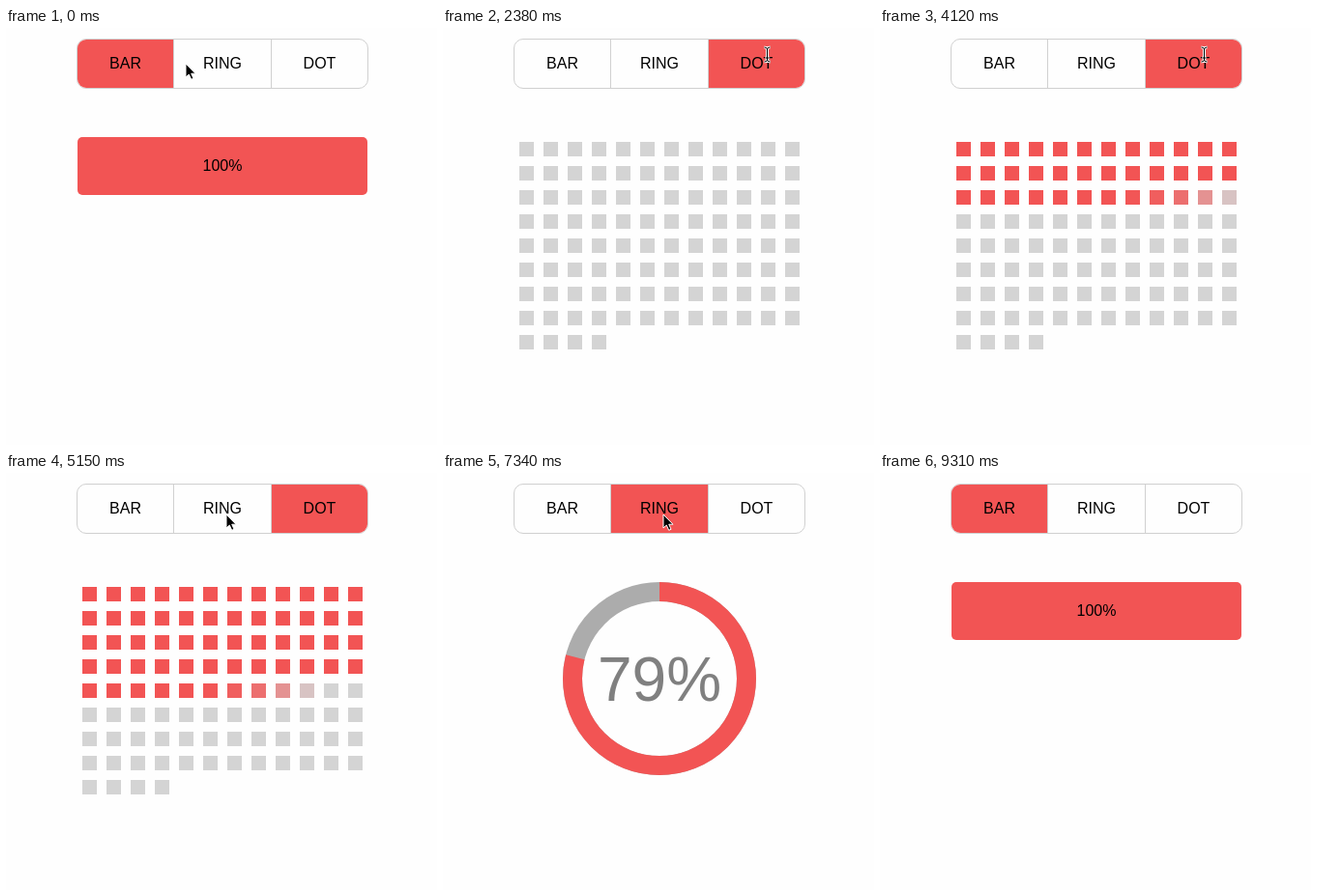
An HTML page for the animation above (9.95 s loop, 446 px wide and 432 px high).

```html
<!DOCTYPE html>
<html lang="en">
<meta charset="utf-8">
<title>Progress: bar, ring, dot</title>
<style>
  html, body { margin: 0; width: 100%; height: 100%; overflow: hidden; background: #fefefe; }
  body { position: relative; font: 16px "Liberation Sans", Arial, sans-serif; color: #000; }
  #tabs, #bar, svg { position: absolute; }
  #tabs { left: 73px; top: 11px; width: 300px; height: 50px; border: 1px solid #d0d0d0;
    border-radius: 10px; overflow: hidden; display: flex; line-height: 50px; text-align: center; }
  #tabs div { width: 99px; }
  #tabs div:nth-child(2) { width: 100px; border: solid #d0d0d0; border-width: 0 1px; }
  #tabs .on, #bar { background: #f25454; }
  #bar { left: 74px; top: 113px; height: 60px; line-height: 60px; border-radius: 5px;
    overflow: hidden; white-space: nowrap; text-align: center; }
  svg { left: 0; top: 0; }
  #ring circle { fill: none; stroke-width: 20; }
</style>
<div id="tabs"><div>BAR</div><div>RING</div><div>DOT</div></div>
<div id="bar"></div>
<svg width="446" height="432">
  <g id="ring">
    <circle cx="224" cy="213" r="90" stroke="#acacac"/>
    <circle id="arc" cx="224" cy="213" r="90" stroke="#f25454" pathLength="100" transform="rotate(-90 224 213)"/>
    <text id="label" x="224" y="235.5" font-size="64" text-anchor="middle" fill="#808080"></text>
  </g>
  <g id="dots"></g>
  <g id="cursor">
    <path id="arrow" d="M0 0V14L3.3 11L5.7 16.3L8 15.3L5.7 10.2H10Z" stroke="#fff" stroke-linejoin="round"/>
    <g id="beam" fill="none">
      <path id="stem" d="M-3 -7.5Q0 -7.5 0 -5.5Q0 -7.5 3 -7.5M0 -5.5V5.5M-3 7.5Q0 7.5 0 5.5Q0 7.5 3 7.5M-2 3.5H2" stroke="#fff" stroke-width="2.6"/>
      <use href="#stem"/>
      <path d="M-3 -7.5Q0 -7.5 0 -5.5Q0 -7.5 3 -7.5M0 -5.5V5.5M-3 7.5Q0 7.5 0 5.5Q0 7.5 3 7.5M-2 3.5H2" stroke="#000"/>
    </g>
  </g>
</svg>
<script>
const $ = id => document.getElementById(id);
const LOOP = 9950, STEP = 57.8, LAST = 161;   // the picture advances once per step
const BAR = 0, RING = 1, DOT = 2;
const RATE = 5.9;                             // percent per step

// start step, view, percent at the start
const views = [[-20, BAR, 100], [9, RING, 2], [41, DOT, 0], [114, RING, 3], [142, BAR, 1]];

// step, x, y, pointer shape
const moves = [
  [0, 186, 37, "arrow"], [1, 196, 36, "arrow"], [2, 210, 39, "beam"],
  [25, 210, 39, "beam"], [26, 227, 38, "beam"], [28, 270, 36, "arrow"],
  [30, 322, 29, "beam"], [31, 344, 22, "arrow"], [32, 340, 27, "beam"],
  [33, 335.5, 29.5, "beam"], [35, 335.5, 29.5, "beam"], [37, 335.5, 27.5, "beam"],
  [76, 335.5, 27.5, "beam"], [77, 300, 32, "arrow"], [82, 53, 40, "arrow"],
  [88, 228, 43, "arrow"], [133, 228, 43, "arrow"], [137, 111, 38, "beam"],
  [157, 111, 38, "beam"], [158, 160, 100, "arrow"], [159, 244, 237, "arrow"],
  [160, 381, 415, "arrow"], [161, 600, 600, "arrow"]
];

const dots = Array.from({ length: 100 }, (_, i) => {
  const r = document.createElementNS("http://www.w3.org/2000/svg", "rect");
  r.setAttribute("x", 79 + i % 12 * 25);
  r.setAttribute("y", 118 + Math.floor(i / 12) * 25);
  r.setAttribute("width", 15);
  r.setAttribute("height", 15);
  return $("dots").appendChild(r);
});

const lastKey = (keys, n) => keys.findLastIndex(k => k[0] <= n);
const mix = (a, b, k) => a + (b - a) * k;
const show = (id, on) => $(id).style.display = on ? "" : "none";

// cubic-bezier(.25, .1, .25, 1)
function ease(x) {
  if (x <= 0) return 0;
  if (x >= 1) return 1;
  let lo = 0, hi = 1, s;
  for (let i = 0; i < 14; i++) {
    s = (lo + hi) / 2;
    if (.75 * s * (1 - s) + s ** 3 < x) lo = s; else hi = s;
  }
  return .3 * s * (1 - s) ** 2 + 3 * s * s * (1 - s) + s ** 3;
}

function drawDots(age) {
  dots.forEach((dot, i) => {
    const k = ease((age * 22 / 18 - i - 1) / 5.5);
    const low = Math.round(mix(212, 84, k));
    dot.setAttribute("fill", `rgb(${Math.round(mix(212, 242, k))},${low},${low})`);
  });
}

function drawCursor(n) {
  const i = lastKey(moves, n), a = moves[i], b = moves[i + 1] || a;
  const k = b === a ? 0 : (n - a[0]) / (b[0] - a[0]);
  $("cursor").setAttribute("transform", `translate(${mix(a[1], b[1], k)} ${mix(a[2], b[2], k)})`);
  show("arrow", a[3] === "arrow");
  show("beam", a[3] === "beam");
}

function draw(n) {
  const [start, view, first] = views[lastKey(views, n)];
  const pct = Math.min(100, Math.floor(first + (n - start) * RATE));
  [...$("tabs").children].forEach((tab, i) => tab.className = i === view ? "on" : "");
  show("bar", view === BAR);
  show("ring", view === RING);
  show("dots", view === DOT);
  $("bar").style.width = pct * 3 + "px";
  $("bar").textContent = $("label").textContent = pct + "%";
  $("arc").setAttribute("stroke-dasharray", pct + " 100");
  if (view === DOT) drawDots(n - start);
  drawCursor(n);
}

const t0 = performance.now();
function tick() {
  const t = (performance.now() - t0) % LOOP;
  draw(Math.min(LAST, Math.floor((t + 3) / STEP)));
  requestAnimationFrame(tick);
}
tick();
</script>
</html>
```
